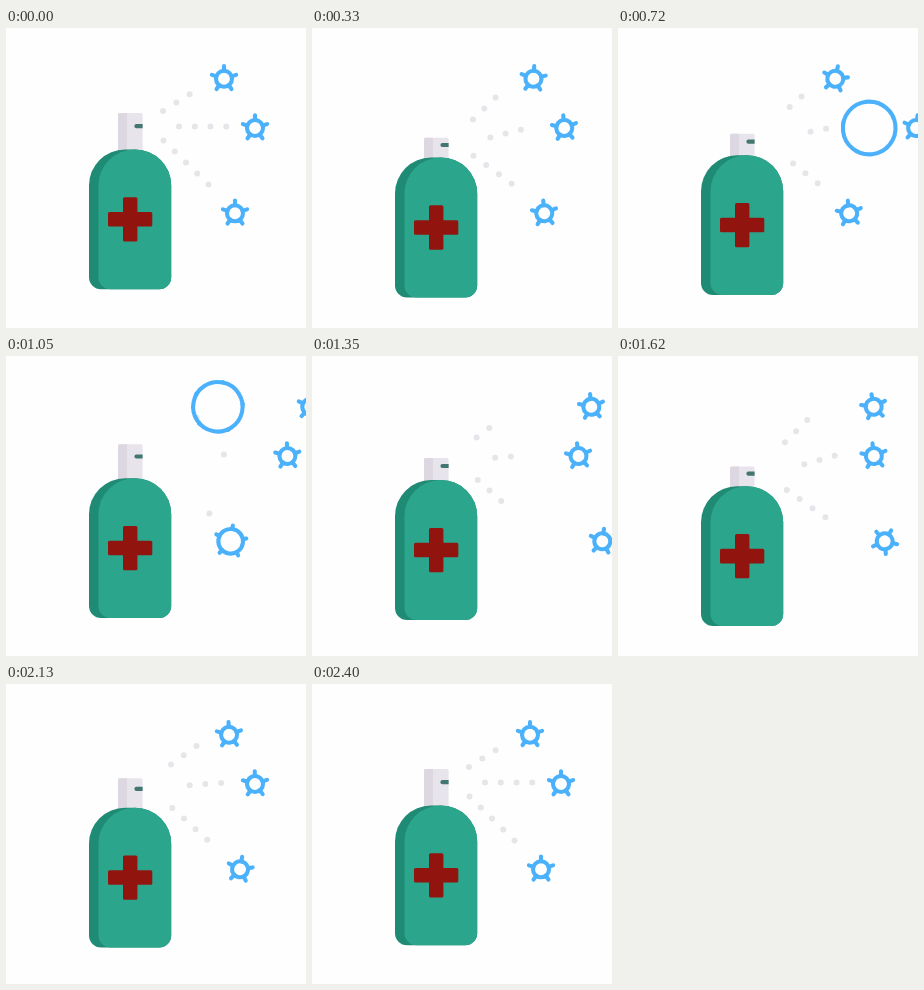
Recreate the animation shown at these times as an HTML page with a canvas. Size 300x300 px, loop 4.43 s.

```html
<!DOCTYPE html>
<html>
<head>
<meta charset="utf-8">
<title>Sanitizer spray</title>
<style>
  html, body { margin: 0; width: 100%; height: 100%; overflow: hidden; background: #fefefe; }
  canvas { display: block; width: 300px; height: 300px; }
</style>
</head>
<body>
<canvas id="stage"></canvas>
<script>
// Times are in seconds.
const LOOP = 4.43, ACTIVE = 2.4, STEP = .03, PRESS = 1.2, BURST = 1.11, POP = .39;
const BLUE = '#4bb1fb', DOT = '#e7e5e9', GREEN = '#2ca58d', SHADE = '#1f8b74', RED = '#92140f';

const canvas = document.getElementById('stage');
const ratio = window.devicePixelRatio || 1;
canvas.width = canvas.height = 300 * ratio;
const ctx = canvas.getContext('2d');
ctx.scale(ratio, ratio);
ctx.lineCap = 'round';

const clamp = x => Math.max(0, Math.min(1, x));
const sine = x => (1 - Math.cos(Math.PI * clamp(x))) / 2;
const wave = (s, half) => Math.sin(Math.PI * s / half);

function box(x, y, w, h, r, color) {
  ctx.fillStyle = color;
  ctx.beginPath();
  ctx.roundRect(x, y, w, h, r);
  ctx.fill();
}

function disc(x, y, r) {
  ctx.beginPath();
  ctx.arc(x, y, r, 0, 2 * Math.PI);
}

// Dots sit at even distances along a line whose ends are trimmed.
function drawLine(x0, y0, x1, y1, from, to) {
  const dx = x1 - x0, dy = y1 - y0, len = Math.hypot(dx, dy);
  ctx.fillStyle = DOT;
  for (let d = from * len; d <= to * len + .5; d += 15.75) {
    disc(x0 + dx * d / len, y0 + dy * d / len, 3);
    ctx.fill();
  }
}

function drawSpray(t, drop) {
  const u = clamp(t / 1.08);
  let from = u * (.3 + .7 * u * u), to = 1;
  if (t >= BURST) {
    from = .285 * Math.sqrt(Math.max(0, wave(t - BURST, ACTIVE - BURST)));
    to = clamp((t - BURST) / .34);
  }
  drawLine(157, 83 + drop, 193, 60.2, from, to);
  drawLine(173, 98.5 + drop, 221, 98.5, from, to);
  drawLine(157.5, 112.5 + drop, 207, 161, from ** 1.15, to);
}

// Ring with five spikes; as pop goes to 1 the ring swallows them.
function drawVirus(x, y, turn, pop = 0) {
  const r = 8 + 18.6 * pop, tip = r + 4.7 * (1 - pop);
  ctx.save();
  ctx.translate(x, y);
  ctx.rotate(turn * Math.PI / 180);
  ctx.strokeStyle = BLUE;
  ctx.lineWidth = 4.1;
  disc(0, 0, r);
  ctx.stroke();
  for (let i = 0; i < 5; i++) {
    ctx.beginPath();
    ctx.moveTo(0, -r);
    ctx.lineTo(0, -tip);
    ctx.stroke();
    ctx.rotate(Math.PI * 2 / 5);
  }
  ctx.restore();
}

// sway is a half period; turn and spin are [degrees per second, half period].
const viruses = [
  { x: 218, y: 50.8, pop: .74, sway: .69, turn: [16, 1.4], start: .42, end: 2.4, dist: 112, spin: [-14, 1.2] },
  { x: 249, y: 100, pop: .36, sway: .84, turn: [-15, .9], start: 0, end: 2.04, dist: 68, spin: [-8, 1.45] },
  { x: 229, y: 185.3, pop: .925, sway: .84, turn: [-15, .9], start: .42, end: 2.4, dist: 112, spin: [50, 1.1] }
];

const wobble = (s, [rate, half]) => rate * s * wave(s, half);

function drawViruses(t) {
  for (const v of viruses) {
    const away = v.dist * (1 - sine((t - v.start) / (v.end - v.start)));
    drawVirus(v.x + away, v.y, wobble(ACTIVE - t, v.spin));
    if (t < v.pop + POP) {
      const sway = 6 * Math.sqrt(t) * wave(t, v.sway);
      drawVirus(v.x + sway, v.y, wobble(t, v.turn), sine((t - v.pop) / POP));
    }
  }
}

function drawBottle(sink, squeeze) {
  const top = 85 + squeeze;
  ctx.save();
  ctx.translate(0, sink);
  box(112, top, 24.6, 130 - top, 1.5, '#e8e4eb');
  box(112, top, 9, 130 - top, [1.5, 0, 0, 0], '#dcd7e1');
  box(128.4, 96.1 + squeeze * .64, 8.2, 4.2, [2, 0, 0, 2], '#437670');
  box(83, 121.4, 82.2, 139.9, [36, 36, 12, 12], SHADE);
  box(92.5, 121.4, 72.7, 139.9, [36, 36, 12, 12], GREEN);
  box(102, 184, 44.3, 14.6, 1.5, RED);
  box(117, 169.2, 14.4, 44.3, 1.5, RED);
  ctx.restore();
}

function draw(t) {
  const p = t % PRESS / PRESS;
  const sink = 8.8 * (sine(p * 3) - sine((p - 1 / 3) * 1.5));
  const squeeze = 16.6 * (sine(p * 6) - sine((p - .5) * 2));
  ctx.fillStyle = '#fefefe';
  ctx.fillRect(0, 0, 300, 300);
  drawSpray(t, sink * 1.52);
  drawViruses(t);
  drawBottle(sink, squeeze);
}

const begin = performance.now();
function tick() {
  const t = (performance.now() - begin) / 1000 % LOOP;
  draw(Math.min(ACTIVE, Math.floor(t / STEP) * STEP));
  requestAnimationFrame(tick);
}
tick();
</script>
</body>
</html>
```
